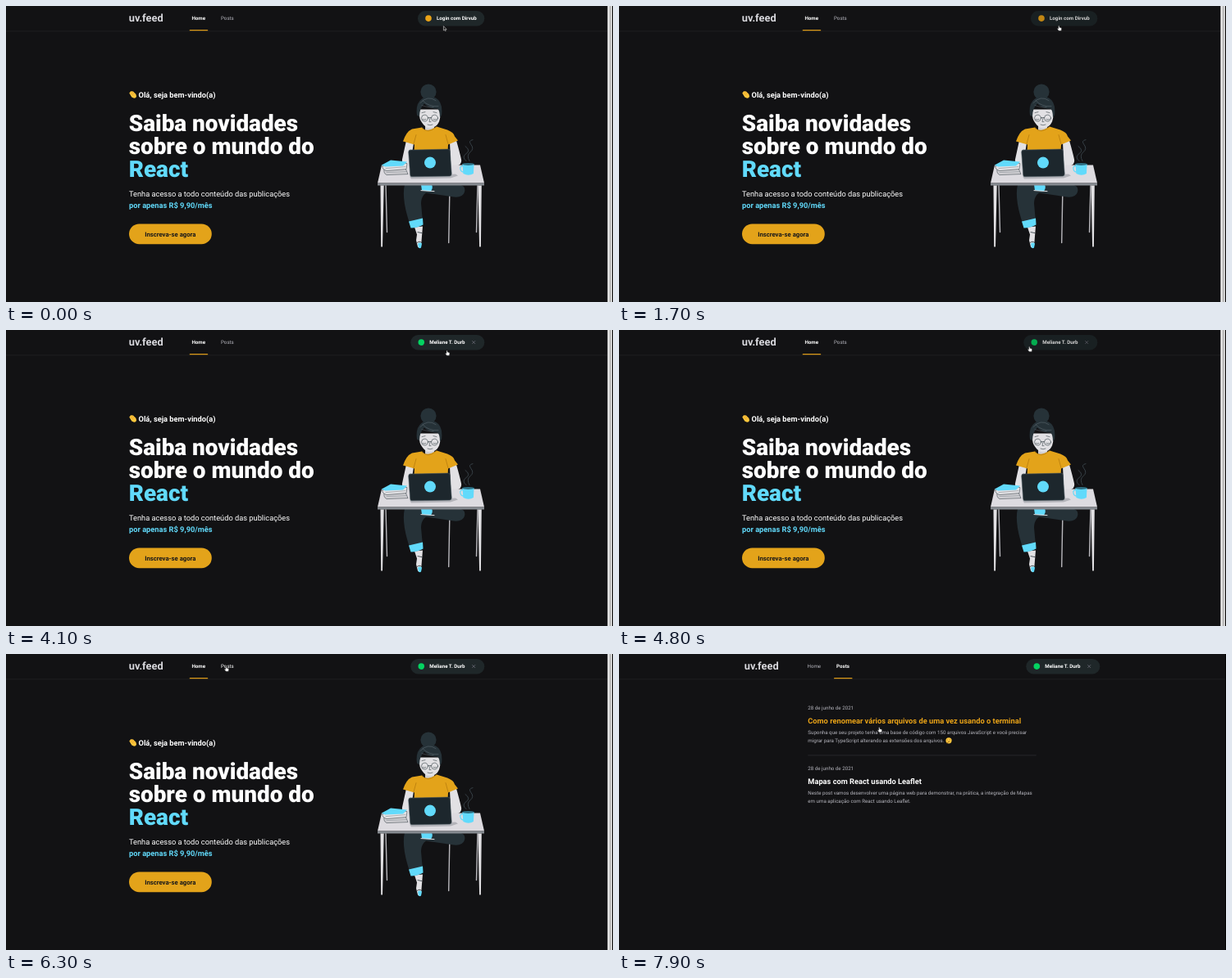
Animation, 740 px wide and 362 px high, one loop 8000 ms. Source, as an HTML page:

```html
<!DOCTYPE html>
<html lang="pt-BR">
<head>
<meta charset="utf-8">
<title>Blog</title>
<style>
  html, body { margin: 0; width: 100%; height: 100%; overflow: hidden; background: #121214; }
  svg { display: block; width: 740px; height: 362px; }
  text { font-family: Roboto, Inter, sans-serif; font-size: 6.19px; fill: #b4b4bc; text-rendering: geometricPrecision; }
  .bold { font-weight: 700; fill: #fff; }
  .logo { font-size: 12.8px; font-weight: 700; fill: #d8d8dd; }
  .hero { font-size: 27.9px; font-weight: 900; fill: #fff; }
  .lead { font-size: 9.28px; fill: #fff; }
  .title { font-size: 9.28px; font-weight: 700; fill: #fff; }
  .cyan { fill: #61dafb; }
  .action { font-size: 7.73px; font-weight: 700; fill: #17171a; }
</style>
</head>
<body>
<svg viewBox="0 0.4 740 362">
  <path d="M0 31.2H740" stroke="#252529" stroke-width=".6"/>

  <g id="header">
    <text class="logo" x="149.8" y="19.2">uv.feed</text>
    <text id="home" x="226.5" y="17.4">Home</text>
    <text id="posts" x="262" y="17.4">Posts</text>
    <path id="underline" d="M0 30.7V30.1Q0 29.3 .8 29.3H21.7Q22.5 29.3 22.5 30.1V30.7Z" fill="#dc9a18"/>
    <g id="login">
      <rect x="502" y="6.4" width="81.3" height="18.4" rx="9.2" fill="#1f2729"/>
      <circle cx="515" cy="15.5" r="3.8" fill="#eba417"/>
      <text class="bold" x="525" y="17.8">Login com Dirvub</text>
    </g>
    <g id="account">
      <rect x="493.3" y="6.4" width="90" height="18.4" rx="9.2" fill="#1f2729"/>
      <circle cx="506.3" cy="15.5" r="3.8" fill="#04d361"/>
      <text class="bold" x="516.3" y="17.8">Meliane T. Durb</text>
      <path d="M568.3 13.6l3.8 3.8m0-3.8l-3.8 3.8" stroke="#737380" stroke-width=".7"/>
    </g>
  </g>

  <g id="homePage">
    <g id="clap">
      <path d="M150.3 106.8l1.2-1.3 1-1.2 1 .6 1.2-.3 3.6 3.6.8 2.6-1 1.8-2 .6-2.8-1.4Z" fill="#ffc83d"/>
      <path d="M151.3 106l4 4M153 105l3.6 3.7" stroke="#c27a14" stroke-width=".5"/>
    </g>
    <text class="lead bold" x="161.5" y="112">Olá, seja bem-vindo(a)</text>
    <text class="hero" x="149.7" y="153.8">Saiba novidades</text>
    <text class="hero" x="149.7" y="181.7">sobre o mundo do</text>
    <text class="hero cyan" x="149.7" y="209.6">React</text>
    <text class="lead" x="150" y="233.5">Tenha acesso a todo conteúdo das publicações</text>
    <text class="lead bold cyan" x="150" y="247.4">por apenas R$ 9,90/mês</text>
    <rect x="150" y="266.8" width="100.8" height="24.8" rx="12.4" fill="#e3a31a"/>
    <text class="action" x="200.3" y="282" text-anchor="middle">Inscreva-se agora</text>

    <g id="illustration" stroke-linejoin="round" stroke-linecap="round">
      <!-- back desk legs -->
      <path d="M463 220l1.5 57M541 220l-1.3 70M575 220l-1.5 57" stroke="#b9b8bd" stroke-width="1.4"/>
      <!-- legs and shoes -->
      <path d="M498 271l10-1-1 12-1 13q-2 2.5-4 0l-2-8 1-7Z" fill="#e2e1e4"/>
      <path d="M502 277l5 1M501 290q3-3 6 0" stroke="#263238" stroke-width=".8" fill="none"/>
      <path d="M502 291q3-2 5 0l-1 5q-1 1.5-3 0Z" fill="#61dafb"/>
      <path d="M486 219H552Q561 220 559 228Q557 235 546 234L512 229Q506 233 506 242L508 264 492 266Q482 236 486 219Z" fill="#263238"/>
      <path d="M506 219h13q2 4-1 8l-11-1Z" fill="#61dafb"/>
      <path d="M506 226l16 1" stroke="#e2e1e4" stroke-width="1"/>
      <path d="M491 264l17-4 .5 8q-7 4-15 4Z" fill="#61dafb"/>
      <!-- bun, face, hair -->
      <circle cx="515" cy="105.5" r="9.6" fill="#263238"/>
      <path d="M511 141h11v12q-5 6-11 0Z" fill="#cfced2"/>
      <path d="M504 127q-1 11 3 16 5 7 10 7 8-1 11-8 2-6 2-15Z" fill="#e2e1e4"/>
      <path d="M501 134q-2-14 6-20 8-5 17-1 9 5 7 21l-2 3q0-9-3-11-10 0-16-6-6 5-6 16Z" fill="#263238"/>
      <path d="M505 119q9-10 19-3M508 116q7 8 19 7M507 122q9 3 14 2" stroke="#75828a" stroke-width=".4" fill="none"/>
      <g fill="none" stroke="#263238" stroke-width=".55">
        <circle cx="510.5" cy="137.5" r="4"/>
        <circle cx="522.5" cy="137.5" r="4"/>
        <path d="M514.5 137h4M508 139q2 1 4 0M521 139q2 1 4 0M517 137l-1 5h2M514 145.5q3 1.5 6 0M507 131l4-1M521 130l4 1"/>
      </g>
      <!-- arms and shirt -->
      <path d="M488 165l9 3-3 19 4 8-8 3q-8-3-7-10ZM541 167l8-2q4 14 6 23 1 6-5 8l-10 1 2-9Z" fill="#e2e1e4"/>
      <path d="M507 149q5 7 18-1l13 4q8 3 9 8l4 5-12 5-1 18H497l1-18-14-4q4-12 11-15Z" fill="#e3a31a"/>
      <path d="M507 149q7 9 18-1M497 169l3-11M539 169l-3-11" fill="none" stroke="#a86f0a" stroke-width=".6"/>
      <!-- desk -->
      <path d="M458 194.8H578L583 216.8H453Z" fill="#dddbe0"/>
      <path d="M453 216.8H583V219.8H453Z" fill="#858a90"/>
      <path d="M456.5 220h4.2l-1.7 75h-1.8ZM575.5 220h4.3l-.9 75h-1.8Z" fill="#e2e1e4"/>
      <path d="M494 212l48-1 9-3-3-2-56 3Z" fill="#b3b3b9"/>
      <!-- laptop -->
      <path d="M493 176.5l46-1q2 0 2.2 2l2 28q0 3-2.5 3l-46 .7q-2 0-2-2.3l-2-28q0-2.4 2.3-2.4Z" fill="#1d272d" stroke="#46545c" stroke-width=".6"/>
      <circle cx="517" cy="192" r="7" fill="#61dafb"/>
      <!-- books -->
      <path d="M461 200l26-1 3 7-26 1q-4-2-3-7Z" fill="#cfced2" stroke="#263238" stroke-width=".5"/>
      <path d="M459 196l10-5 20 2-1 7-24 2q-6-2-5-6Z" fill="#e2e1e4" stroke="#263238" stroke-width=".5"/>
      <path d="M458 195l11-6 20 2-5 5-22 1Z" fill="#61dafb"/>
      <path d="M463 199l24-2M464 204l24-1" stroke="#7b858b" stroke-width=".5"/>
      <!-- mug -->
      <path d="M557 196q-4 0-3 4t4 3" fill="none" stroke="#61dafb" stroke-width="1.2"/>
      <path d="M556.5 193.5h14l-.6 12q-6 3.5-12.5 0Z" fill="#61dafb"/>
      <ellipse cx="563.5" cy="193.8" rx="7" ry="1.5" fill="#2e6f83"/>
      <path d="M561 190q-6-5 0-9t-1-9M565 190q-4-7 1-11t1-9 2-6" fill="none" stroke="#414c53" stroke-width=".8"/>
    </g>

    <path d="M736.2 0V363" stroke="#f3f3f3" stroke-width="5.6"/>
    <path d="M736.8 0V363" stroke="#bdbdbd" stroke-width="3"/>
  </g>

  <g id="postsPage">
    <text x="230.3" y="68.3">28 de junho de 2021</text>
    <text id="firstTitle" class="title" x="230.3" y="85.4">Como renomear vários arquivos de uma vez usando o terminal</text>
    <text x="230.3" y="98.7">Suponha que seu projeto tenha uma base de código com 150 arquivos JavaScript e você precisar</text>
    <text x="230.3" y="108.6">migrar para TypeScript alterando as extensões dos arquivos.</text>
    <circle cx="402" cy="106.2" r="3.6" fill="#ffc83d"/>
    <path d="M400 105.4h.8M403 105h.8M401 107.8l2.5-.6M399 109.7l2.4-1.5" stroke="#704214" stroke-width=".7"/>
    <path d="M230.3 124.3H508.7" stroke="#2c2c31" stroke-width=".8"/>
    <text x="230.3" y="142.7">28 de junho de 2021</text>
    <text class="title" x="230.3" y="159.7">Mapas com React usando Leaflet</text>
    <text x="230.3" y="172.9">Neste post vamos desenvolver uma página web para demonstrar, na prática, a integração de Mapas</text>
    <text x="230.3" y="182.9">em uma aplicação com React usando Leaflet.</text>
  </g>
  <path d="M739.5 0V363" stroke="#000"/>

  <g id="cursor">
    <path id="arrow" d="M-1.6-3V2.2L-.4 1.2.4 3 1.3 2.6.5.9H2.1Z" fill="#111" stroke="#ddd" stroke-width=".6"/>
    <path id="hand" d="M-1.3-3q.9-.6 1.1.4l.2 1.5 1.8.4q.9.2.8 1.2L2.2 3H-1L-2.6.8q-.3-.9.6-.7l.7.4Z" fill="#fff" stroke="#222" stroke-width=".45"/>
  </g>
</svg>
<script>
const LOOP = 8000, STEP = 100;
const el = id => document.getElementById(id);
const show = (id, on) => el(id).setAttribute('display', on ? 'inline' : 'none');
const within = (t, ranges) => ranges.some(([from, to]) => t >= from && t < to);

// time, x, y of the pointer
const path = [
  [0, 535, 28], [300, 196, 284], [800, 196, 284], [1700, 537, 27.7],
  [4000, 537, 27.7], [4300, 542, 31], [4600, 507, 24.5], [4700, 507, 24.5],
  [4800, 501, 23.8], [5500, 269, 18.7], [7300, 269, 18.7], [7900, 318, 93.2]
];
const handTimes = [[300, 900], [1700, 4200], [4500, 4900], [5400, 7400], [7600, LOOP]];
const dimTimes = [[1700, 3400], [4500, 4900]];

function pointer(t) {
  const next = path.findIndex(key => key[0] > t);
  if (next < 0) return path[path.length - 1].slice(1);
  const [t0, x0, y0] = path[next - 1], [t1, x1, y1] = path[next];
  const p = (t - t0) / (t1 - t0), e = p * p * (3 - 2 * p);
  return [x0 + (x1 - x0) * e, y0 + (y1 - y0) * e];
}

function navLink(id, active, bright) {
  el(id).style.fontWeight = active ? 700 : 400;
  el(id).style.fill = active || bright ? '#fff' : '#b4b4bc';
}

function render(now) {
  const t = Math.floor(now % LOOP / STEP) * STEP;
  const onPosts = t >= 7000, signedIn = t >= 3600;
  const dim = within(t, dimTimes) ? 'brightness(.82)' : 'none';

  show('homePage', !onPosts);
  show('postsPage', onPosts);
  show('login', !signedIn);
  show('account', signedIn);
  el('login').style.filter = el('account').style.filter = dim;

  // The page centre moves when the scrollbar disappears.
  el('header').setAttribute('transform', `translate(${onPosts ? 3 : 0})`);
  el('underline').setAttribute('transform', `translate(${onPosts ? 259 : 223.7})`);
  navLink('home', !onPosts, t < 7100);
  navLink('posts', onPosts, t >= 5400);
  el('firstTitle').style.fill = t >= 7600 ? '#eba417' : '#fff';

  const hand = within(t, handTimes);
  show('hand', hand);
  show('arrow', !hand);
  el('cursor').setAttribute('transform', `translate(${pointer(t)})`);
}

const start = performance.now();
function frame() {
  render(performance.now() - start);
  requestAnimationFrame(frame);
}
frame();
</script>
</body>
</html>
```
